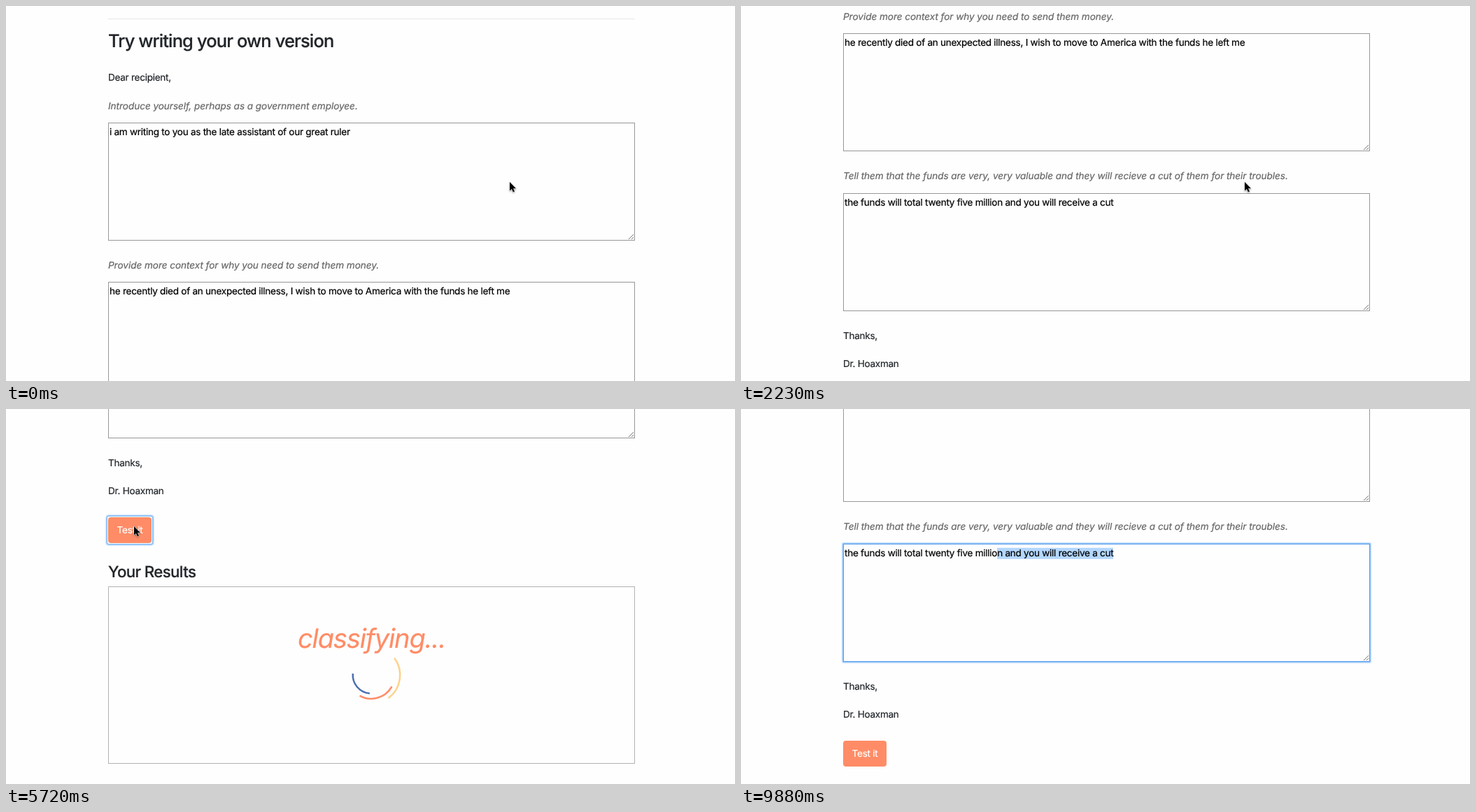
An HTML page for the animation above (9980 ms loop, 1042 px wide and 537 px high).

```html
<!DOCTYPE html>
<html lang="en">
<head>
<meta charset="utf-8">
<title>Write your own version</title>
<style>
  html, body { margin: 0; width: 100%; height: 100%; overflow: hidden; background: #fefefe; }
  body {
    position: relative;
    font: 400 13.6px/20px Inter, "Open Sans", sans-serif;
    font-optical-sizing: none;
    letter-spacing: -.0215em;
    text-rendering: geometricPrecision;
    -webkit-text-stroke: .2px;
    color: #212529;
  }
  #page { position: absolute; inset: 0; will-change: transform; }
  #page > * { position: absolute; left: 146px; top: var(--y); margin: 0; box-sizing: border-box; }
  /* --y of a text row is the middle of its line */
  .row { white-space: pre; transform: translateY(-50%); line-height: 1.5; }
  hr { width: 753px; height: 1px; border: 0; background: #e6e6e6; }
  h3 { font-size: 25.5px; font-weight: 500; letter-spacing: -.035em; }
  h4 { font-size: 22.3px; font-weight: 500; letter-spacing: -.029em; }
  .hint { font-style: italic; letter-spacing: -.0042em; color: #666; }
  .area { width: 753px; height: 169px; border: 1px solid #979797; color: #000; }
  .area .row { position: absolute; left: 1px; top: 12.5px; }
  .area::after {
    content: ""; position: absolute; right: 1px; bottom: 1px; width: 7px; height: 7px;
    background: linear-gradient(135deg, #0000 48%, #777 48% 57%, #0000 57% 74%, #777 74% 84%, #0000 84%);
  }
  .area.focus { border-color: #5a9fec; box-shadow: 0 0 2px 1px #62a8f4; }
  .area .sel { background: #b3d7ff; }
  #button {
    width: 62px; height: 37px; border-radius: 4px; background: #ff8c66;
    color: #fff; text-align: center; line-height: 38.6px;
  }
  #button.focus::before {
    content: ""; position: absolute; inset: -1px; border-radius: 2px;
    box-shadow: 0 0 2px 2px #7fb8f6;
  }
  #box { width: 753px; height: 254px; border: 1px solid #b2b2b2; }
  .big { font-size: 38px; color: #ff8c66; }
  #busy { width: 753px; text-align: center; font-style: italic; letter-spacing: -.03em; }
  #result { font-weight: 500; letter-spacing: -.0255em; -webkit-text-stroke-width: .6px; }
  #page > #spinner { left: 477.3px; width: 90px; height: 90px; }
  #spinner circle { fill: none; stroke-width: 2.5; stroke-dasharray: 90 270; }
  .pointer { position: absolute; left: 0; top: 0; overflow: visible; width: 1px; height: 1px; }
</style>
</head>
<body>
<div id="page">
  <hr style="--y:18px">
  <h3 class="row" style="--y:50.5px">Try writing your own version</h3>
  <p class="row" style="--y:103px">Dear recipient,</p>
  <p class="row hint" style="--y:143.5px">Introduce yourself, perhaps as a government employee.</p>
  <div class="area" style="--y:167px"><span class="row">i am writing to you as the late assistant of our great ruler</span></div>
  <p class="row hint" style="--y:371.5px">Provide more context for why you need to send them money.</p>
  <div class="area" style="--y:395px"><span class="row">he recently died of an unexpected illness, I wish to move to America with the funds he left me</span></div>
  <p class="row hint" style="--y:600px">Tell them that the funds are very, very valuable and they will recieve a cut of them for their troubles.</p>
  <div class="area" id="funds" style="--y:624px"><span class="row"><span id="plain"></span><span id="marked" class="sel"></span></span></div>
  <p class="row" style="--y:828.5px">Thanks,</p>
  <p class="row" style="--y:869px">Dr. Hoaxman</p>
  <div id="button" style="--y:906px">Test it</div>
  <h4 class="row" style="--y:985px">Your Results</h4>
  <div id="box" style="--y:1005px"></div>
  <p class="row big" id="busy" style="--y:1080px">classifying...</p>
  <svg id="spinner" style="--y:1086.6px" viewBox="-45 -45 90 90">
    <circle r="41.2" pathLength="360" stroke="#fcd28c"/>
    <circle r="33.8" pathLength="360" stroke="#ff8c66"/>
    <circle r="26.3" pathLength="360" stroke="#4a70b2"/>
  </svg>
  <p class="row big" id="result" style="--y:1038px">Your message was classified as spam!</p>
</div>
<svg class="pointer" id="arrow">
  <path d="M0 0V12.6L2.9 9.9 4.9 14.5 7 13.6 5 9.2H9Z" fill="#000" stroke="#fff" stroke-width="1" paint-order="stroke"
    style="filter:drop-shadow(0 1px 1px #0006)"/>
</svg>
<svg class="pointer" id="beam">
  <path d="M-3 -6.5Q0 -6.5 0 -4.5Q0 -6.5 3 -6.5M0 -4.5V4.5M-3 6.5Q0 6.5 0 4.5Q0 6.5 3 6.5M-1.5 1.5H1.5" fill="none" stroke="#222" stroke-width="1.2"/>
</svg>
<script>
  const LOOP = 9980;
  const CLICK = 5070, RESULT = 7790, BEAM = 8370, SELECT = 9760;
  const TICK = 650 / 7;
  const TEXT = "the funds will total twenty five million and you will receive a cut";
  const $ = id => document.getElementById(id);
  const rings = [...document.querySelectorAll("#spinner circle")];

  // a move shows its first step at start and its last one at end
  const move = (start, end, steps, ...to) => ({ start, end, steps, to });
  const drag = (...to) => move(SELECT, 9880, 2, ...to);

  const scrolling = [
    move(1080, 2080, 7, 187),
    move(2230, 2980, 6, 740),
    move(3760, 3760, 1, 751),
    move(9020, 9460, 4, 431)
  ];
  const pointing = [
    move(3910, 4480, 5, 183, 168),
    move(7890, 8280, 5, 446, 223),
    move(BEAM, BEAM, 1, 542, 266.5),
    drag(-3, 213)
  ];
  const selecting = [drag(39)];

  const easeOut = p => 1 - (1 - p) ** 2;

  function follow(value, moves, t) {
    for (const { start, end, steps, to } of moves) {
      if (t < start) break;
      const part = Math.min(1, (t - start) / (end - start || 1));
      const step = 1 + Math.floor(part * (steps - 1) + 1e-6);
      const p = easeOut(step / steps);
      value = value.map((v, i) => v + (to[i] - v) * p);
    }
    return value;
  }

  const show = (id, on) => { $(id).style.visibility = on ? "visible" : "hidden"; };

  function draw(t) {
    const [scroll] = follow([0], scrolling, t);
    $("page").style.transform = `translateY(${-Math.round(scroll)}px)`;

    const [x, y] = follow([720, 252], pointing, t);
    for (const id of ["arrow", "beam"]) $(id).style.transform = `translate(${x}px, ${y}px)`;
    show("arrow", t < BEAM);
    show("beam", t >= BEAM);

    const [cut] = follow([TEXT.length], selecting, t);
    $("plain").textContent = TEXT.slice(0, cut);
    $("marked").textContent = TEXT.slice(cut);

    $("button").classList.toggle("focus", t >= CLICK && t < SELECT);
    $("funds").classList.toggle("focus", t >= SELECT);

    const busy = t >= CLICK + TICK && t < RESULT;
    show("busy", busy);
    show("spinner", busy);
    show("result", t >= RESULT);

    // the spinner starts just after the click and advances in ticks
    const spin = (Math.floor((t - CLICK) / TICK + 1e-6) * TICK - 103) / 1000;
    rings.forEach((ring, i) => ring.setAttribute("transform", `rotate(${spin * (180 + 120 * i) - 135})`));
  }

  const origin = performance.now();
  function frame() {
    draw((performance.now() - origin) % LOOP);
    requestAnimationFrame(frame);
  }
  frame();
</script>
</body>
</html>
```
